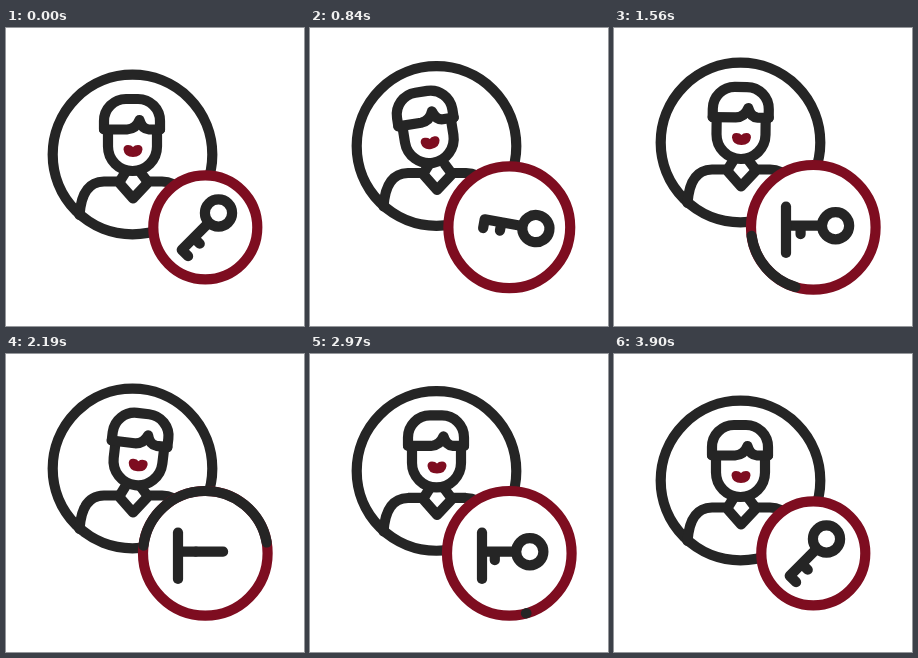
Write an HTML page that moves like this. It is 298x298 px and loops after 4500 ms.

```html
<!DOCTYPE html>
<html lang="en">
<head>
<meta charset="utf-8">
<title>User access key</title>
<style>
  html, body { margin: 0; width: 100%; height: 100%; overflow: hidden; background: #fff; }
  svg { display: block; width: 100vw; height: 100vh; }
  .line { fill: none; stroke: #252525; stroke-width: 10.2; stroke-linecap: round; stroke-linejoin: round; }
  .red { stroke: #7e0d20; }
</style>
</head>
<body>
<svg viewBox="0 0 298 298">
  <defs>
    <clipPath id="lock"><rect x="172" y="130" width="126" height="140"/></clipPath>
  </defs>
  <g id="user" class="line">
    <circle cx="126.500" cy="126.500" r="79.800"/>
    <path d="M73.500 187C75 166 82 154 98 153.500H112L127 170.500L143 153.500H156C172 154 180 166 181 188"/>
    <path d="M119 145L114 153M135 145L141 153"/>
    <g id="head">
      <path fill="#fff" d="M102 104V118.500a24.500 24.500 0 0 0 49 0V104"/>
      <path d="M98 101V93a22 22 0 0 1 22 -22h12a22 22 0 0 1 22 22V101.500"/>
      <path d="M98 101.500H121Q130 101 133.500 92Q136 101 143 101.500H154"/>
      <path fill="#7e0d20" stroke="none" d="M117.500 121.500q0 -4.500 4.500 -4.500q3.500 0 5 2q1.500 -2 5 -2q4.500 0 4.500 4.500q-1 7.500 -9.500 7.500q-8.500 0 -9.500 -7.500z"/>
    </g>
  </g>
  <g class="line" transform="translate(199.300 199.300)">
    <circle id="ring" class="red" style="fill:#fff"/>
    <path id="arc"/>
  </g>
  <g id="slot" class="line">
    <g id="key">
      <ellipse id="bow" rx="13.600"/>
      <path id="shaft"/>
    </g>
  </g>
  <path id="bar" class="line"/>
</svg>
<script>
const LOOP = 4500, STEP = 30;
const $ = id => document.getElementById(id);
const [user, head, ring, arc, slot, key, bow, shaft, bar] =
  ['user', 'head', 'ring', 'arc', 'slot', 'key', 'bow', 'shaft', 'bar'].map($);

const set = (el, attrs) => Object.entries(attrs).forEach(([k, v]) => el.setAttribute(k, v));
const show = (el, on) => { el.style.display = on ? '' : 'none'; };
const point = (deg, r) => {
  const a = deg * Math.PI / 180;
  return `${r * Math.cos(a)} ${r * Math.sin(a)}`;
};

function draw(t) {
  // Sine ease from 0 to 1, and the same up and back down.
  const ease = (a, b) => (1 - Math.cos(Math.PI * Math.min(1, Math.max(0, (t - a) / (b - a))))) / 2;
  const hold = (a, b, c, d) => ease(a, b) - ease(c, d);

  const lift = hold(330, 1130, 2700, 3600);
  const lean = 6.8 * hold(1100, 1900, 2230, 2970) - 9.3 * hold(330, 900, 1100, 1900);
  set(user, { transform: `translate(0 ${-12 * lift})` });
  set(head, { transform: `rotate(${lean} 127 165)` });

  const r = 52 + 10.3 * hold(330, 1000, 3350, 3900);
  const finish = ease(2190, 2560);
  const tail = 75 + 112 * ease(1360, 1920) + 247 * finish;
  const tip = 75 + 275 * ease(1315, 1920) + 84.5 * finish;
  set(ring, { r });
  set(arc, { d: `M${point(tail, r)}A${r} ${r} 0 ${+(tip - tail > 180)} 1 ${point(tip, r)}` });
  show(arc, t >= 1350 && t < 3030);

  const level = hold(330, 990, 3200, 3840);
  const swing = hold(330, 990, 990, 1400);
  const reach = hold(330, 1100, 3330, 3840);
  const insert = hold(1330, 1920, 2500, 3330);
  const x = 212.5 + 18 * reach - 27 * insert;
  const y = 185 + 12.7 * level + 5 * swing;
  const spin = 45 * (level - 1) + 18 * swing;
  set(key, { transform: `translate(${x} ${y}) rotate(${spin})` });

  const flat = Math.cos(Math.PI / 2 * hold(1560, 2000, 2300, 2800));
  set(bow, { ry: Math.max(13.6 * flat, 0.01) });
  set(shaft, { d: `M-14 0H-52V${9 * flat}M-35 0V${8.5 * flat}` });

  const len = 46.5 * hold(1090, 1400, 3030, 3300);
  set(bar, { d: `M172 178.500v${len}` });
  show(bar, len > 0);
  set(slot, { 'clip-path': len > 0 ? 'url(#lock)' : 'none' });
}

const start = performance.now();
function tick() {
  const t = (performance.now() - start) % LOOP;
  draw(Math.floor(t / STEP) * STEP);
  requestAnimationFrame(tick);
}
tick();
</script>
</body>
</html>
```
